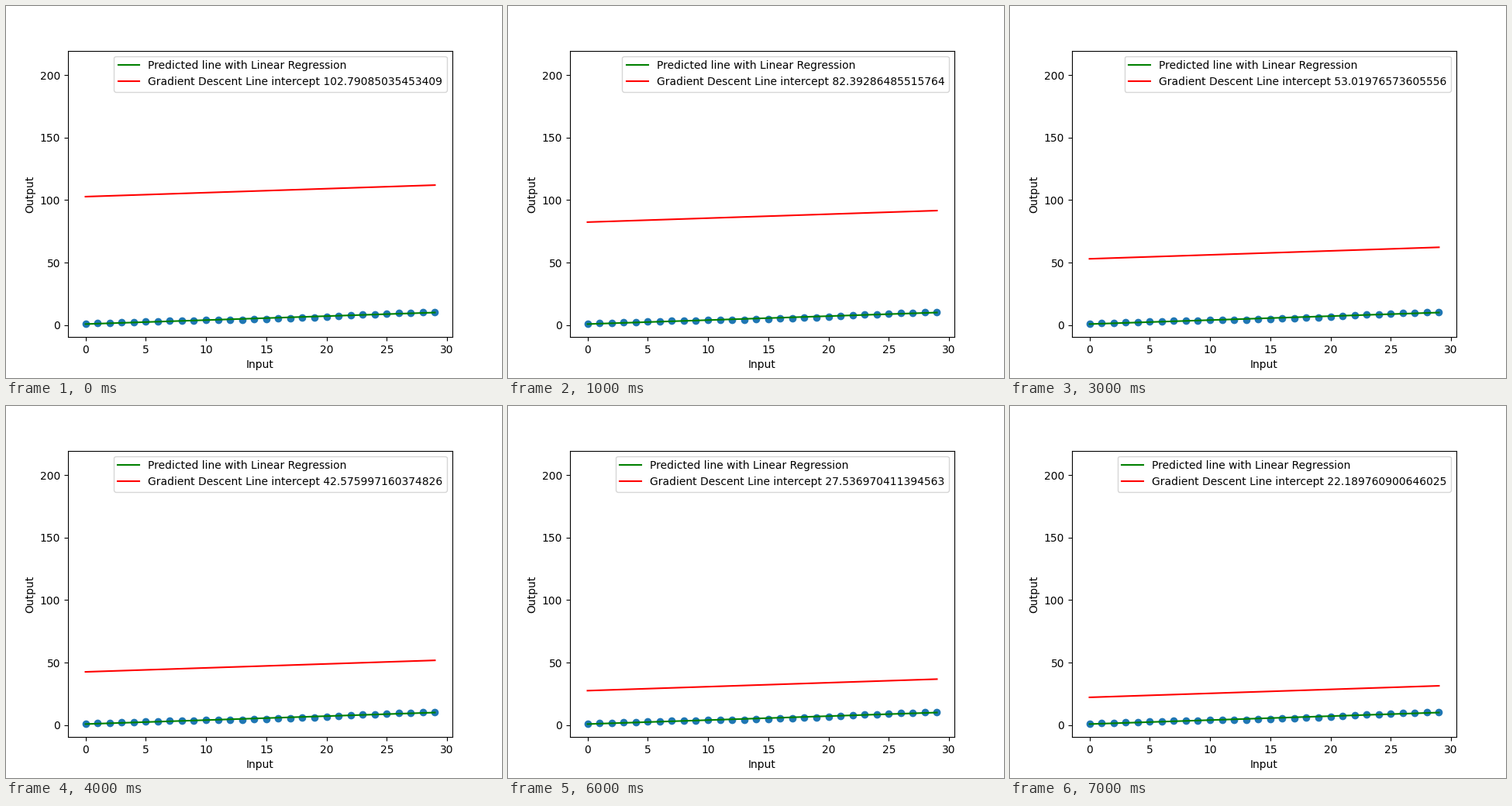
A matplotlib script for the animation above (8000 ms loop, 640 px wide and 480 px high).

```python
import matplotlib.pyplot as plt
import numpy as np
from matplotlib.animation import FuncAnimation

STEPS = 8
RATE = 0.2
SLOPE, BEST = 0.3181, 0.800922857651875
PEAK = 200  # the vertical range has room for a line starting this high
FIRST = 102.79085035453409

x = np.arange(30)
y = np.interp(x, [0, 4, 10, 13, 19, 22, 29],
              [1.2, 2.45, 4.05, 4.3, 6.1, 8.0, 10.6])


def line(intercept):
    return intercept + SLOPE * x


def intercept_at(step):
    """Gradient descent: every step closes a fifth of the gap to BEST."""
    value = FIRST
    for _ in range(step):
        value -= RATE * (value - BEST)
    return value


def padded(low, high):
    pad = 0.05 * (high - low)
    return low - pad, high + pad


fig, ax = plt.subplots(figsize=(6.4, 4.8), dpi=100)
ax.scatter(x, y)
ax.plot(x, line(BEST), color="green", label="Predicted line with Linear Regression")
descent, = ax.plot(x, line(FIRST), color="red")
ax.set_xlim(padded(x[0], x[-1]))
ax.set_ylim(padded(BEST, line(PEAK)[-1]))
ax.set_xlabel("Input")
ax.set_ylabel("Output")


def update(step):
    intercept = intercept_at(step)
    descent.set_ydata(line(intercept))
    descent.set_label(f"Gradient Descent Line intercept {intercept}")
    ax.legend(loc="upper right")
    return descent,


anim = FuncAnimation(fig, update, frames=STEPS, interval=1000,
                     repeat=True, repeat_delay=0)
plt.show()
```
